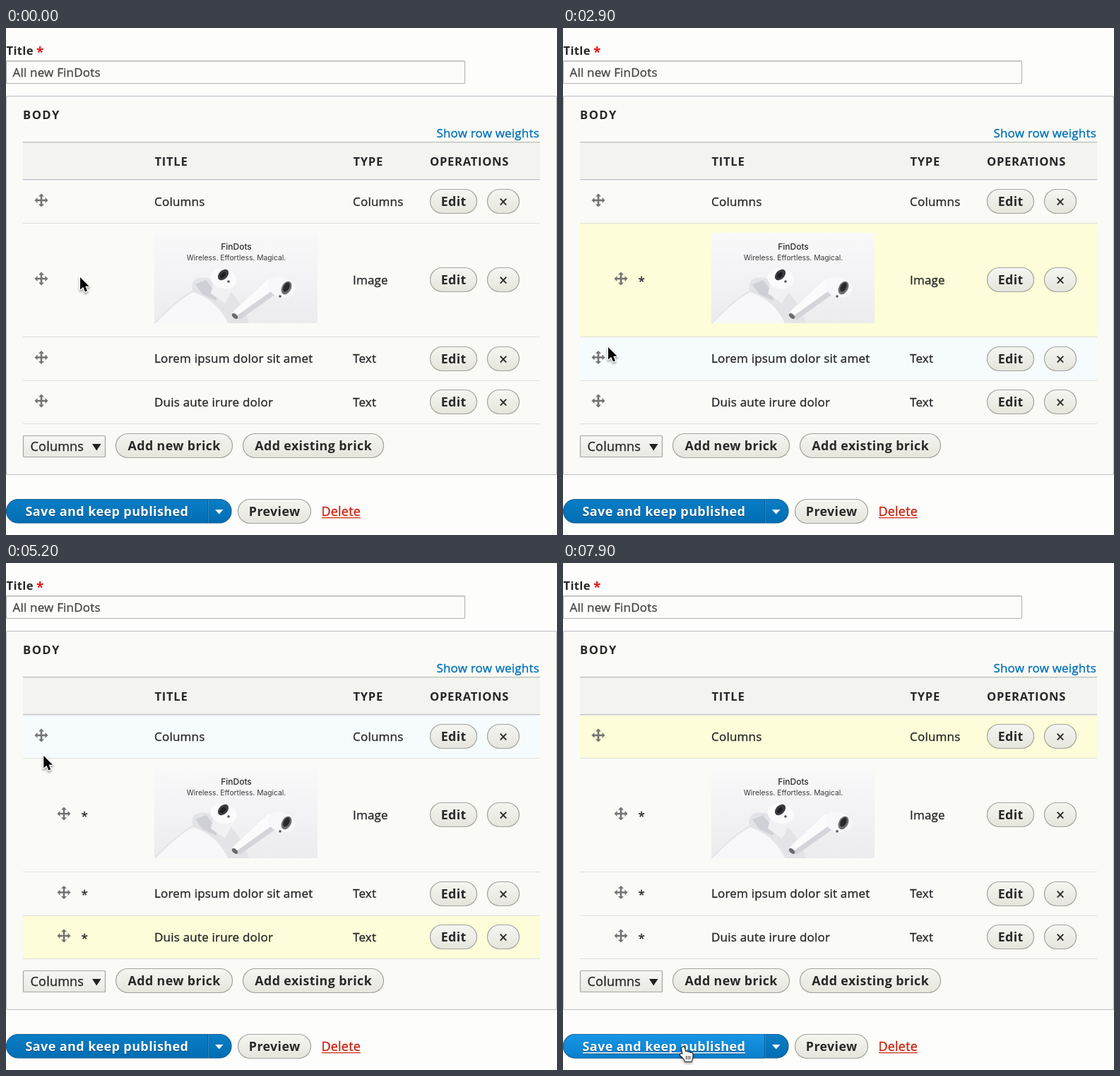
An HTML page with a canvas for the animation above (8 s loop, 780 by 718 pixels).

```html
<!DOCTYPE html>
<html lang="en">
<head>
<meta charset="utf-8">
<title>Sortable bricks form</title>
<style>
html, body { margin: 0; width: 100%; height: 100%; overflow: hidden; background: #fdfdfb; }
canvas { display: block; }
</style>
</head>
<body>
<canvas id="stage" width="780" height="718"></canvas>
<script>
const ctx = document.getElementById('stage').getContext('2d');
const LOOP = 8000, INDENT = 32, FOCUS_AT = 7400, RIPPLE = 400;
const SANS = '"Open Sans", "Noto Sans", sans-serif';
const INTER = 'Inter, Roboto, sans-serif';

const rows = [
  { top: 215, bottom: 276, title: 'Columns', type: 'Columns' },
  { top: 276, bottom: 437, type: 'Image' },
  { top: 437, bottom: 499, title: 'Lorem ipsum dolor sit amet', type: 'Text' },
  { top: 499, bottom: 560, title: 'Duis aute irure dolor', type: 'Text' }
];
rows.forEach(r => { r.mid = (r.top + r.bottom) / 2; });

// Each drag: row, press time, drop time, whether the row gets indented
const drags = [
  { row: 1, press: 1550, drop: 2350, indent: true },
  { row: 2, press: 3250, drop: 3750, indent: true },
  { row: 3, press: 4050, drop: 4600, indent: true },
  { row: 0, press: 5500, drop: 6200, indent: false }
];

// Pointer path: time, x, y
const path = [
  [0, 105, 353], [500, 105, 353], [1300, 50, 355], [1550, 50, 355], [1700, 55, 358],
  [2050, 82, 358], [2350, 82, 359], [2900, 64, 452], [3100, 51, 467], [3250, 51, 467],
  [3550, 81, 468], [3750, 81, 468], [4000, 52, 524], [4050, 52, 524], [4300, 80, 527],
  [4600, 82, 527], [5350, 50, 244], [5500, 50, 244], [5800, 54, 249], [6200, 54, 249],
  [7000, 180, 670], [7350, 170, 685], [LOOP, 170, 685]
];

function pointer(t) {
  let i = 1;
  while (i < path.length - 1 && path[i][0] < t) i++;
  const [t0, x0, y0] = path[i - 1], [t1, x1, y1] = path[i];
  const k = Math.min(1, (t - t0) / (t1 - t0)), e = k * k * (3 - 2 * k);
  return { x: x0 + (x1 - x0) * e, y: y0 + (y1 - y0) * e };
}

// A hairline outline gives regular text a slightly heavier stem
function text(s, x, y, o = {}) {
  const { size = 17, weight = 400, color = '#282828', gap = 0.2, align = 'left', family = SANS } = o;
  ctx.font = `${weight} ${size}px ${family}`;
  ctx.letterSpacing = gap + 'px';
  ctx.textAlign = align;
  ctx.fillStyle = color;
  ctx.fillText(s, x, y);
  if (weight === 400 && family === SANS) {
    ctx.strokeStyle = color;
    ctx.lineWidth = 0.35;
    ctx.strokeText(s, x, y);
  }
}

function rect(x, y, w, h, color) {
  ctx.fillStyle = color;
  ctx.fillRect(x, y, w, h);
}

function shade(y0, y1, from, to) {
  const g = ctx.createLinearGradient(0, y0, 0, y1);
  g.addColorStop(0, from);
  g.addColorStop(1, to);
  return g;
}

function box(x, y, w, h, r, fill, stroke) {
  ctx.beginPath();
  ctx.roundRect(x + 0.5, y + 0.5, w - 1, h - 1, r);
  ctx.fillStyle = fill;
  ctx.fill();
  ctx.strokeStyle = stroke;
  ctx.lineWidth = 1.2;
  ctx.stroke();
}

function poly(points, fill) {
  ctx.beginPath();
  points.forEach(([x, y]) => ctx.lineTo(x, y));
  ctx.closePath();
  ctx.fillStyle = fill;
  ctx.fill();
}

function oval(x, y, rx, ry, turn, fill) {
  ctx.beginPath();
  ctx.ellipse(x, y, rx, ry, turn, 0, Math.PI * 2);
  ctx.fillStyle = fill;
  ctx.fill();
}

function button(label, x, y, w) {
  box(x, y, w, 35, 17, shade(y, y + 35, '#f6f6f2', '#e5e5dd'), '#a3a39e');
  if (label === '×') text(label, x + w / 2, y + 26, { size: 21, gap: 0, align: 'center' });
  else text(label, x + w / 2 + 0.2, y + 24, { size: 17.8, weight: 700, gap: 0.4, align: 'center' });
}

// Four-way arrow made of two bars and four heads
function cross(x, y, r, head, bar) {
  ctx.save();
  ctx.translate(x, y);
  ctx.beginPath();
  for (let i = 0; i < 4; i++) {
    ctx.lineTo(bar, -bar);
    ctx.lineTo(bar, head - r);
    ctx.lineTo(head, head - r);
    ctx.lineTo(0, -r);
    ctx.lineTo(-head, head - r);
    ctx.lineTo(-bar, head - r);
    ctx.lineTo(-bar, -bar);
    ctx.rotate(-Math.PI / 2);
  }
  ctx.closePath();
  ctx.restore();
}

function handle(x, y, dark) {
  cross(x, y, 9.5, 4, 1.3);
  ctx.fillStyle = dark ? '#1c1c1c' : '#737373';
  ctx.fill();
}

function photo() {
  rect(210, 290, 231, 128, shade(290, 418, '#f9f9fa', '#ececef'));
  ctx.save();
  ctx.beginPath();
  ctx.rect(210, 290, 231, 128);
  ctx.clip();
  // charging case
  ctx.beginPath();
  ctx.moveTo(210, 418);
  ctx.quadraticCurveTo(240, 385, 264, 372);
  ctx.quadraticCurveTo(260, 350, 286, 354);
  ctx.quadraticCurveTo(326, 366, 344, 418);
  ctx.fillStyle = '#e3e3e8';
  ctx.fill();
  ctx.beginPath();
  ctx.moveTo(212, 418);
  ctx.quadraticCurveTo(242, 386, 265, 374);
  ctx.quadraticCurveTo(300, 386, 314, 418);
  ctx.fillStyle = '#f8f8fa';
  ctx.fill();
  poly([[268, 363], [283, 357], [300, 378], [297, 386], [278, 377]], '#cfcfd6');
  // earbud in the case
  poly([[296, 352], [322, 368], [310, 390], [290, 376]], '#f1f1f4');
  oval(308, 355, 19, 14, 0.25, '#fafafb');
  oval(307.5, 349.5, 9, 6, -0.8, '#3c3c40');
  oval(307, 350, 5, 3, -0.8, '#1f1f22');
  oval(315, 359, 1.8, 1.8, 0, '#555558');
  // earbud lying outside
  poly([[372, 354], [386, 374], [331, 413], [319, 404]], '#d4d4da');
  poly([[372, 354], [382, 368], [326, 408], [319, 404]], '#fbfbfc');
  oval(390, 367, 20, 14, 0.3, '#f8f8fa');
  oval(397, 368, 6.5, 10, 0.5, '#6c6c71');
  oval(397, 367, 4, 7, 0.5, '#29292c');
  oval(388, 380, 1.8, 1.8, 0, '#555558');
  oval(324, 408, 5, 3, 0.7, '#6a6a70');
  ctx.restore();
  text('FinDots', 326, 314, { size: 12, weight: 500, gap: 0, align: 'center', family: INTER, color: '#2b2b2b' });
  text('Wireless. Effortless. Magical.', 326, 329, { size: 10.3, gap: 0, align: 'center', family: INTER, color: '#3a3a3a' });
}

function form() {
  rect(0, 0, 780, 718, '#fdfdfb');
  text('Title', 0.5, 38, { size: 16.6, weight: 700, gap: 0.3 });
  text('*', 43, 41, { size: 19, weight: 700, color: '#e0161b' });
  box(0, 46, 650, 33, 1, '#fcfcfa', '#b5b5b2');
  rect(1, 47, 648, 1, '#d8d8d5');
  text('All new FinDots', 9.5, 69, { color: '#484848' });

  box(0, 96, 780, 537, 2, '#fafaf7', '#bdbdc6');
  text('BODY', 24, 129, { size: 16.6, weight: 700, gap: 1.5 });
  text('Show row weights', 755, 155, { color: '#0071b8', align: 'right' });
  rect(24, 162, 732, 53, '#f3f3f0');
  rect(24, 161, 732, 1.3, '#bebeb6');
  rect(24, 214, 732, 1.3, '#bdbdca');
  const head = { size: 16.6, weight: 700, gap: 0.7 };
  text('TITLE', 210.5, 195, head);
  text('TYPE', 491.5, 195, head);
  text('OPERATIONS', 600, 195, head);
}

function footer(hover, focus) {
  box(24, 577, 117, 31, 1, shade(577, 608, '#f6f6f3', '#e9e9e4'), '#a5a5a2');
  text('Columns', 34.5, 599, { size: 18 });
  poly([[122, 589], [134.5, 589], [128.2, 598.5]], '#222');
  button('Add new brick', 155, 574, 166);
  button('Add existing brick', 335, 574, 200);

  box(0, 667, 319.5, 34.5, 17, shade(667, 702, '#0a7ec6', '#006db2'), '#1b5f94');
  if (hover) {
    ctx.save();
    ctx.beginPath();
    ctx.rect(0, 667, 285, 35);
    ctx.clip();
    box(0, 667, 319.5, 34.5, 17, shade(667, 702, '#1796e6', '#0a7fcb'), '#1b6ca8');
    ctx.restore();
  }
  rect(285, 668, 1, 33, '#0a5c96');
  rect(286, 668, 1, 33, 'rgba(255,255,255,.15)');
  poly([[296, 682], [307.5, 682], [301.7, 688.5]], '#fff');
  ctx.save();
  ctx.shadowColor = 'rgba(0,0,0,.4)';
  ctx.shadowOffsetY = 1;
  ctx.shadowBlur = 1;
  text('Save and keep published', 27.5, 691, { size: 18, weight: 700, gap: 0.4, color: '#fff' });
  if (focus) rect(28, 693, 230, 1.5, '#fff');
  ctx.restore();
  button('Preview', 328, 667, 104);
  text('Delete', 446.5, 691, { size: 18, color: '#c9210f' });
  rect(447, 693, 55, 1.2, '#c9210f');
}

function tree(row, last) {
  const y = Math.round(row.mid - 1);
  rect(47, y - 20, 1.4, last ? 20 : 42, '#8a8a88');
  rect(47, y, 22, 1.4, '#8a8a88');
}

// Draws the rows and tells whether the pointer holds or touches a handle
function table(t, p) {
  const active = drags.find(d => t >= d.press && t < d.drop);
  const last = drags.filter(d => t >= d.drop).pop();
  let grab = Boolean(active);
  rows.forEach((r, i) => {
    const hover = active ? active.row === i : t > 400 && p.y >= r.top && p.y < r.bottom;
    const previous = !active && last && last.row === i;
    const tint = hover ? '#f6fbfd' : previous ? '#fdfdd9' : null;
    if (tint) rect(24, r.top + 1, 732, r.bottom - r.top - 1, tint);
    rect(24, r.bottom, 732, 1, '#dfdfda');

    const d = drags.find(g => g.row === i);
    const dropped = t >= d.drop;
    const moved = d.indent && (dropped || (active === d && p.x > 50 + INDENT / 2));
    const x = 50 + (moved ? INDENT : 0), y = r.mid - 1.5;
    const over = Math.abs(p.x - x) < 12 && Math.abs(p.y - y) < 12;
    grab = grab || over;
    if (active && active.row === 0 && i > 0) tree(r, i === 3);
    handle(x, y, active === d || (!active && over));
    if (d.indent && dropped) text('*', 106.5, r.mid + 7);

    if (r.title) text(r.title, 210, r.mid + 6);
    else photo();
    text(r.type, 491, r.mid + 6);
    button('Edit', 600, Math.round(r.mid - 17.5), 67);
    button('×', 681, Math.round(r.mid - 17.5), 46);
  });
  return grab;
}

function ripple(t) {
  const start = drags.map(d => d.press).concat(FOCUS_AT).find(s => t >= s && t < s + RIPPLE);
  if (start === undefined) return;
  const age = t - start, fade = 1 - age / RIPPLE, at = pointer(start);
  ctx.beginPath();
  ctx.arc(at.x, at.y, 8 + age * 0.126, 0, Math.PI * 2);
  ctx.save();
  ctx.shadowColor = `rgba(90,60,100,${fade * 0.5})`;
  ctx.shadowBlur = 3;
  ctx.strokeStyle = `rgba(218,100,222,${fade * 0.8})`;
  ctx.lineWidth = 4.5;
  ctx.stroke();
  ctx.restore();
  ctx.globalAlpha = Math.min(1, fade * 3);
  oval(at.x, at.y, 8.2, 8.2, 0, '#c98fc6');
  oval(at.x, at.y, 7.3, 7.3, 0, '#ee4fdf');
  ctx.globalAlpha = 1;
}

// Outlines a shape with a soft shadow, then fills it
function outlined(shape, fill, stroke, width) {
  ctx.save();
  ctx.lineJoin = 'round';
  ctx.shadowColor = 'rgba(0,0,0,.4)';
  ctx.shadowBlur = 3;
  ctx.shadowOffsetY = 2;
  ctx.strokeStyle = stroke;
  ctx.lineWidth = width;
  if (shape) ctx.stroke(shape); else ctx.stroke();
  ctx.restore();
  ctx.fillStyle = fill;
  if (shape) ctx.fill(shape); else ctx.fill();
}

const arrowShape = new Path2D('M0 0V17.5L4.2 13.8L7 20.5L10 19.2L7.2 12.7H12.6Z');
const handShape = new Path2D('M3 21Q2 17-4 12Q-4.5 8.5-.5 10.8L-2 2Q0-1.5 2 2L3.2 7.5Q5.5 5.5 6.8 8Q9 6.5 10.2 9Q13.5 8.2 13.6 11Q13.6 16 11.8 21Z');

function cursor(p, grab, link) {
  if (grab) {
    cross(p.x, p.y, 10.5, 4.2, 1.5);
    outlined(null, '#000', '#fff', 3);
    return;
  }
  ctx.save();
  ctx.translate(p.x, p.y);
  if (link) {
    outlined(handShape, '#fff', '#111', 2);
    for (let i = 0; i < 3; i++) rect(4 + i * 2.6, 13, 1, 5, '#222');
  } else {
    outlined(arrowShape, '#000', '#fff', 2.6);
  }
  ctx.restore();
}

function draw(t) {
  const p = pointer(t);
  const link = p.x < 285 && p.y >= 667 && p.y < 702;
  form();
  const grab = table(t, p);
  footer(link, t >= FOCUS_AT);
  ripple(t);
  cursor(p, grab, link);
}

const begin = performance.now();
function tick() {
  draw((performance.now() - begin) % LOOP);
  requestAnimationFrame(tick);
}
tick();
</script>
</body>
</html>
```
